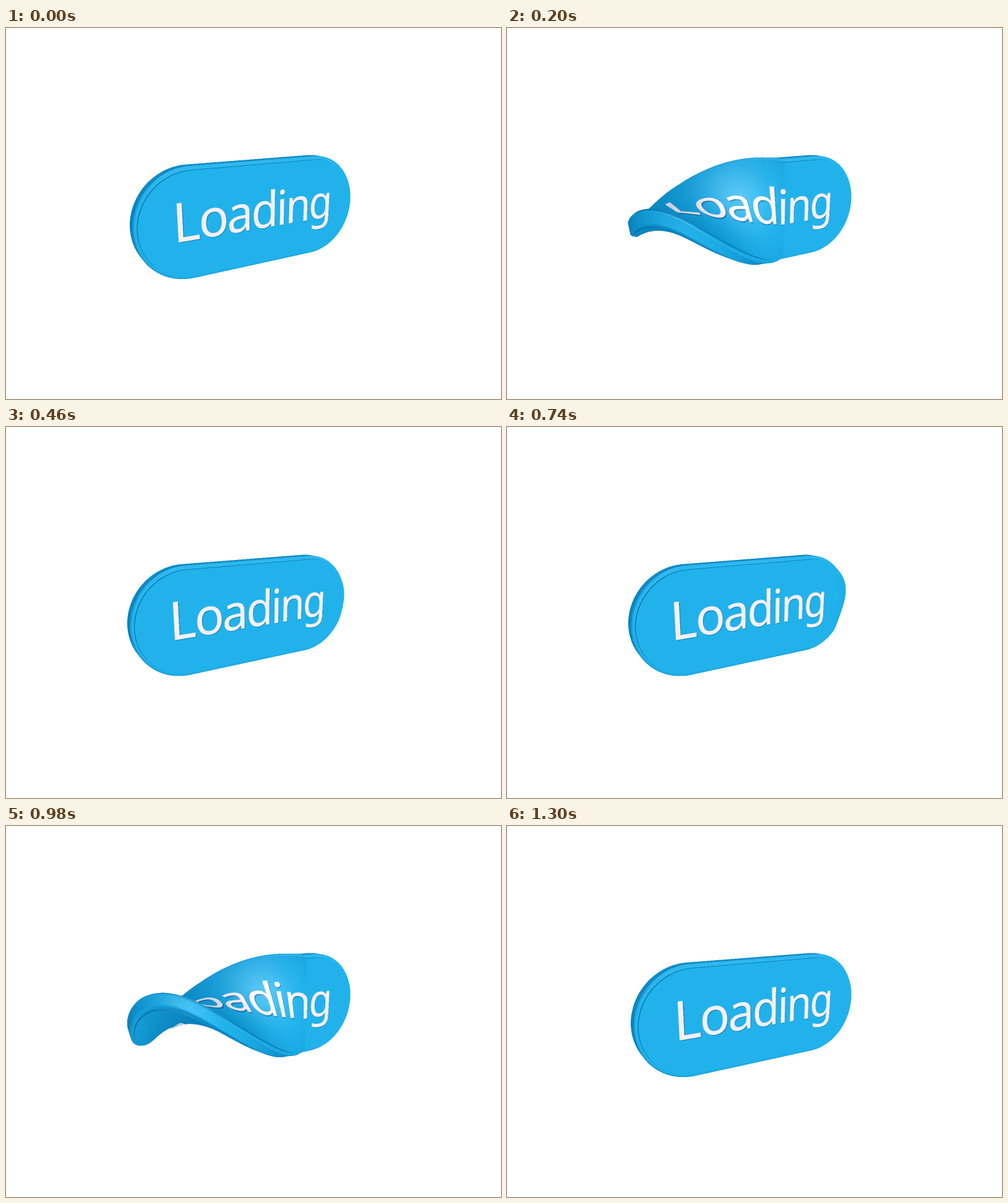
These frames come from a looping animation (800 by 600 pixels, 1320 ms). An HTML page with a canvas:

```html
<!DOCTYPE html>
<html lang="en">
<head>
<meta charset="utf-8">
<title>Loading</title>
<style>
html, body { margin: 0; width: 100%; height: 100%; overflow: hidden; background: #fff; }
canvas { display: block; width: 800px; height: 600px; }
</style>
</head>
<body>
<canvas id="stage" width="800" height="600"></canvas>
<script>
const LOOP = 1320;
const ctx = document.getElementById('stage').getContext('2d');

// Supersampled drawing area around the pill
const SS = 2, LEFT = 180, TOP = 190, WIDTH = 400, HEIGHT = 230;
const bw = WIDTH * SS, bh = HEIGHT * SS;
const buffer = document.createElement('canvas');
buffer.width = bw;
buffer.height = bh;
const bufferCtx = buffer.getContext('2d');
const image = bufferCtx.createImageData(bw, bh);
const pixels = image.data;
const depth = new Float32Array(bw * bh);

// Pill: straight half-length, corner radius, thickness, twist axis
const STRAIGHT = 112.3, RADIUS = 81.7, HALF = STRAIGHT + RADIUS, THICK = 27;
const AXIS_V = -1.6, AXIS_N = -22;
const TWIST_WIDTH = 358;

// Rim cross-section: outward offset, depth
const PROFILE = [[0, 0], [0.4, -2.6], [4.3, -3.4], [5.7, -5.4],
                 [5.7, -21.6], [4.3, -23.6], [0.4, -24.4], [0, -THICK]];

const BLUE = { dark: [8, 130, 188], light: [32, 180, 238] };
const GROOVE = { dark: [6, 112, 165], light: [10, 138, 194] };
const SHADOW = { dark: [6, 100, 150], light: [12, 132, 188] };
const TEXT_SIDE = { dark: [160, 172, 200], light: [206, 214, 228] };
const TEXT = { dark: [196, 198, 220], light: [245, 241, 244] };

// The word as an alpha mask, in pill units
const MASK = { scale: 3, u: -160, v: 50, w: 320, h: 100 };
const maskAlpha = makeMask();

function makeMask() {
  const c = document.createElement('canvas');
  c.width = MASK.w * MASK.scale;
  c.height = MASK.h * MASK.scale;
  const g = c.getContext('2d');
  g.scale(MASK.scale, MASK.scale);
  g.font = "82.5px 'Noto Sans', 'Open Sans', sans-serif";
  g.letterSpacing = '-3.1px';
  g.fillText('Loading', -144.5 - MASK.u, MASK.v + 22.8);
  const d = g.getImageData(0, 0, c.width, c.height).data;
  return Uint8Array.from({ length: c.width * c.height }, (_, i) => d[i * 4 + 3]);
}

function maskAt(s, t) {
  const x = (s - MASK.u) * MASK.scale | 0, y = (MASK.v - t) * MASK.scale | 0;
  if (x < 0 || y < 0 || x >= MASK.w * MASK.scale || y >= MASK.h * MASK.scale) return 0;
  return maskAlpha[y * MASK.w * MASK.scale + x] / 255;
}

const clamp01 = x => Math.min(1, Math.max(0, x));
const smooth = x => { const p = clamp01(x); return p * p * (3 - 2 * p); };

// Right-hand end of the twisted zone, sweeping over the pill and back
function twistEdge(t) {
  return t < 670 ? -230 + 800 * smooth(t / 510) : 570 - 800 * smooth((t - 670) / 550);
}

let edge = 0;

// Twists, lights and projects one point with its normal
function vertex(u, v, n, nu, nv, nn, paint, s, t) {
  const part = (edge - u) / TWIST_WIDTH;
  const angle = Math.PI * clamp01(part);
  const cos = Math.cos(angle), sin = Math.sin(angle);
  const rate = part > 0 && part < 1 ? -Math.PI / TWIST_WIDTH : 0;
  const dv = v - AXIS_V, dn = n - AXIS_N;
  const tv = AXIS_V + dv * cos + dn * sin;
  const tn = AXIS_N - dv * sin + dn * cos;

  const along = nu - rate * (dn * nv - dv * nn);
  const len = Math.hypot(along, nv, nn);
  const a = along / len;
  const b = (nv * cos + nn * sin) / len;
  const c = (nn * cos - nv * sin) / len;
  const diffuse = Math.min(1, Math.max(0, 0.3 * b + 0.95 * c) ** 1.2);
  const shine = 62 * Math.max(0, 0.6 * b + 0.77 * c - 0.2 * a) ** 12;
  const tone = i => paint.dark[i] + (paint.light[i] - paint.dark[i]) * diffuse;

  const x = 8.4 + 0.8717 * u + 0.4899 * tn;
  const y = 2.4 - 0.1308 * u - 0.9638 * tv + 0.2327 * tn;
  const z = 650 + 0.4722 * u - 0.2669 * tv - 0.8402 * tn;
  return {
    x: (400 - LEFT + 650 * x / z) * SS,
    y: (300 - TOP + 650 * y / z) * SS,
    w: 650 / z,
    r: tone(0) + shine, g: tone(1) + shine * 0.4, b: tone(2) + shine * 0.2,
    s, t
  };
}

function triangle(p, q, r, masked) {
  const area = (q.x - p.x) * (r.y - p.y) - (r.x - p.x) * (q.y - p.y);
  if (Math.abs(area) < 1e-6) return;
  const x0 = Math.max(0, Math.ceil(Math.min(p.x, q.x, r.x) - 0.5));
  const x1 = Math.min(bw - 1, Math.floor(Math.max(p.x, q.x, r.x) - 0.5));
  const y0 = Math.max(0, Math.ceil(Math.min(p.y, q.y, r.y) - 0.5));
  const y1 = Math.min(bh - 1, Math.floor(Math.max(p.y, q.y, r.y) - 0.5));
  for (let y = y0; y <= y1; y++) {
    for (let x = x0; x <= x1; x++) {
      const px = x + 0.5, py = y + 0.5;
      const i = ((q.x - px) * (r.y - py) - (r.x - px) * (q.y - py)) / area;
      const j = ((r.x - px) * (p.y - py) - (p.x - px) * (r.y - py)) / area;
      const k = 1 - i - j;
      if (i < -1e-6 || j < -1e-6 || k < -1e-6) continue;
      const w = i * p.w + j * q.w + k * r.w;
      const at = y * bw + x;
      if (w <= depth[at]) continue;
      const alpha = masked
        ? maskAt(i * p.s + j * q.s + k * r.s, i * p.t + j * q.t + k * r.t) : 1;
      if (alpha < 0.02) continue;
      if (alpha > 0.5) depth[at] = w;
      const o = at * 4;
      pixels[o] += (i * p.r + j * q.r + k * r.r - pixels[o]) * alpha;
      pixels[o + 1] += (i * p.g + j * q.g + k * r.g - pixels[o + 1]) * alpha;
      pixels[o + 2] += (i * p.b + j * q.b + k * r.b - pixels[o + 2]) * alpha;
    }
  }
}

// Fills a grid of vertices given by at(i, j)
function mesh(cols, rows, at, masked) {
  let prev = null;
  for (let i = 0; i <= cols; i++) {
    const line = [];
    for (let j = 0; j <= rows; j++) line.push(at(i, j));
    for (let j = 0; prev && j < rows; j++) {
      triangle(prev[j], line[j], line[j + 1], masked);
      triangle(prev[j], line[j + 1], prev[j + 1], masked);
    }
    prev = line;
  }
}

const overhang = u => Math.max(0, Math.abs(u) - STRAIGHT);
const halfHeight = (u, radius) => Math.sqrt(Math.max(0, radius ** 2 - overhang(u) ** 2));

function drawFace(side) {
  mesh(96, 6, (i, j) => {
    const u = HALF * Math.sin(Math.PI * (i / 96 - 0.5));
    const v = halfHeight(u, RADIUS) * (j / 3 - 1);
    return vertex(u, v, side > 0 ? 0 : -THICK, 0, 0, side, BLUE);
  });
}

function drawRim() {
  for (let k = 0; k + 1 < PROFILE.length; k++) {
    const ends = [PROFILE[k], PROFILE[k + 1]];
    const out = ends[0][1] - ends[1][1], up = ends[1][0] - ends[0][0];
    const len = Math.hypot(out, up);
    const paint = k === 0 || k === PROFILE.length - 2 ? GROOVE : BLUE;
    mesh(192, 1, (i, j) => {
      const [offset, n] = ends[j];
      const radius = RADIUS + offset, turn = Math.PI * i / 96;
      const u = (HALF + offset) * Math.cos(turn);
      const v = Math.sign(Math.sin(turn)) * halfHeight(u, radius);
      const nu = Math.sign(u) * overhang(u) / radius, nv = v / radius;
      return vertex(u, v, n, nu * out / len, nv * out / len, up / len, paint);
    });
  }
}

function drawWord(side, height, paint, shift = 0) {
  mesh(80, 4, (i, j) => {
    const u = -152 + 304 * i / 80, v = -48 + 24 * j;
    const n = side > 0 ? height : -THICK - height;
    return vertex(u, side * v, n, 0, 0, side, paint, u - shift, v + shift);
  }, true);
}

function render(t) {
  edge = twistEdge(t);
  pixels.fill(255);
  depth.fill(0);
  drawRim();
  for (const side of [1, -1]) drawFace(side);
  for (const side of [1, -1]) {
    drawWord(side, 0.3, SHADOW, 1.7);
    drawWord(side, 1.2, TEXT_SIDE);
    drawWord(side, 2, TEXT);
  }
  bufferCtx.putImageData(image, 0, 0);
  ctx.fillStyle = '#fff';
  ctx.fillRect(0, 0, 800, 600);
  ctx.drawImage(buffer, LEFT, TOP, WIDTH, HEIGHT);
}

const start = performance.now();
function tick() {
  render((performance.now() - start) % LOOP);
  requestAnimationFrame(tick);
}
tick();
</script>
</body>
</html>
```
